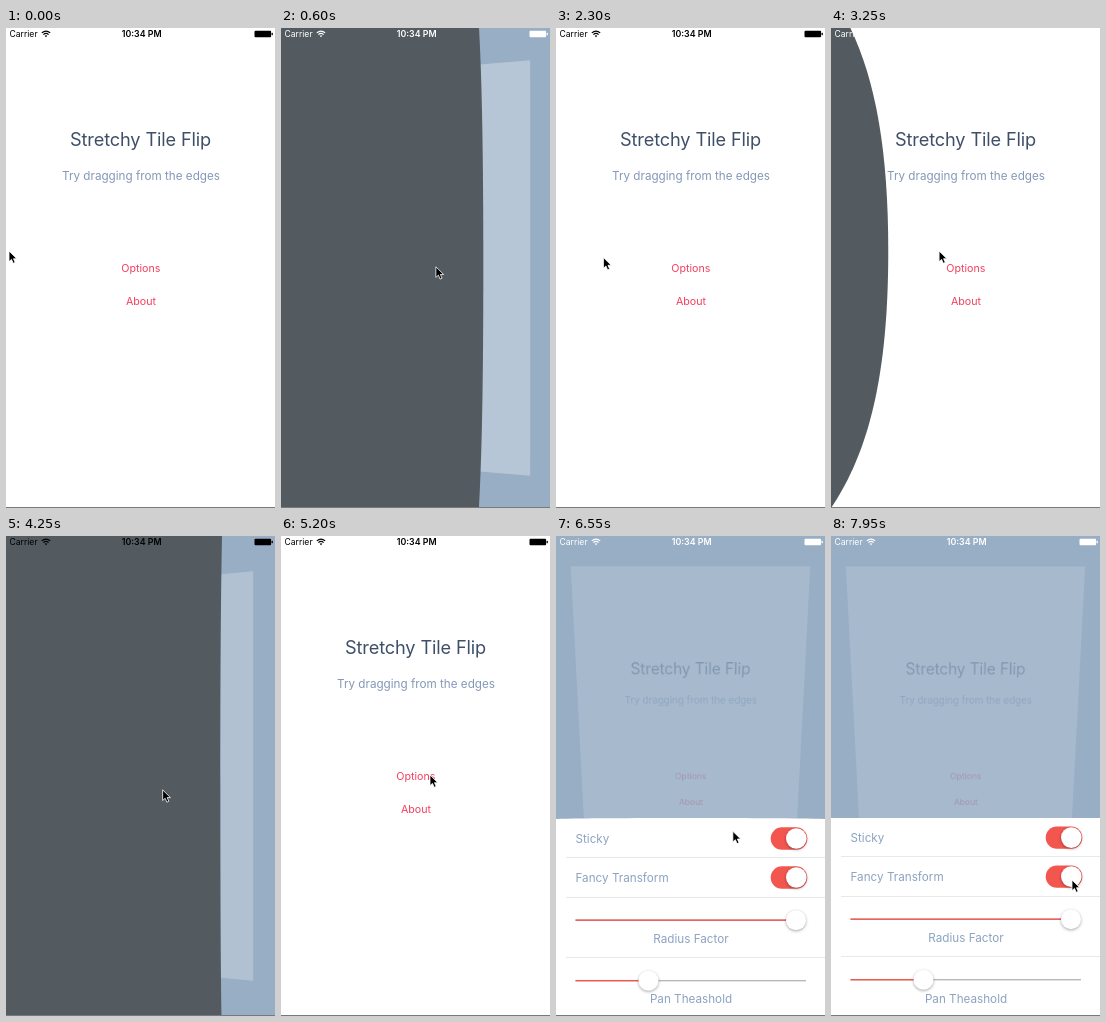
Recreate the animation shown at these times as an HTML page. Size 269 px wide and 480 px high, loop 8 s.

```html
<!DOCTYPE html>
<html lang="en">
<head>
<meta charset="utf-8">
<title>Drag menu demo</title>
<style>
  html, body { margin: 0; width: 100%; height: 100%; overflow: hidden; background: #98aec5; }
  body { position: relative; }
  #home, #top { position: absolute; left: 0; top: 0; width: 269px; height: 480px; }
  #home { background: #fff; transform-origin: 134.5px 240px; }
  svg { display: block; overflow: hidden; }
  text { font-family: Inter, Roboto, sans-serif; }
  .mid { text-anchor: middle; }
  .link { font-size: 10.7px; fill: #f2405f; }
  .label { font-size: 11.7px; fill: #8ca3c1; }
  .knob { fill: #fff; filter: drop-shadow(0 1px 1.5px rgba(0,0,0,.35)); }
</style>
</head>
<body>
<div id="home">
  <svg width="269" height="480">
    <text class="mid" x="134.5" y="118" font-size="18.2" letter-spacing="-.15" fill="#3f4f68">Stretchy Tile Flip</text>
    <text class="mid" x="135" y="151.8" font-size="11.7" fill="#8498b7">Try dragging from the edges</text>
    <text class="mid link" id="options" x="134.8" y="244">Options</text>
    <text class="mid link" x="135" y="277">About</text>
    <rect id="dim" width="269" height="480" fill="#92a9c1"/>
  </svg>
</div>
<svg id="top" width="269" height="480">
  <path id="side" fill="#535b60"/>
  <path id="sheet" fill="#fff"/>
  <g id="rows">
    <path d="M10 38.5H269M10 78.5H269M10 138.5H269" stroke="#e2e4e8" stroke-width=".8"/>
    <text class="label" x="19.5" y="23.6">Sticky</text>
    <text class="label" x="19.5" y="62.6">Fancy Transform</text>
    <text class="label mid" x="135" y="124">Radius Factor</text>
    <text class="label mid" x="135" y="184.5">Pan Theashold</text>
  </g>
  <g id="status">
    <text x="3.5" y="9.2" font-size="8.6">Carrier</text>
    <text class="mid" x="135.7" y="9.3" font-size="8.8" font-weight="600">10:34 PM</text>
    <path d="M35.8 4.9Q40 1.2 44.2 4.9M37.4 6.6Q40 4.3 42.6 6.6" fill="none" stroke="currentColor" stroke-width="1.2"/>
    <path d="M38.7 7.8Q40 6.8 41.3 7.8L40 9.2Z"/>
    <rect x="248.5" y="2.8" width="16.6" height="6.4" rx="1"/>
    <rect x="265.6" y="4.8" width="1.2" height="2.4" rx=".5"/>
  </g>
  <path d="M0 479.5H269" stroke="#77797c"/>
  <path id="cursor" d="M0 0V10.6L2.5 8.4L4.2 12.3L6.2 11.4L4.5 7.7H7.8Z" fill="#000" stroke="#fff" stroke-width=".8"/>
</svg>
<script>
const LOOP = 8000, W = 269, H = 480, OPEN = 215, SHEET = 282;
const $ = id => document.getElementById(id);
const clamp = v => Math.max(0, Math.min(1, v));

// time, x, y of the pointer
const POINTER = [
  [0, 3, 223], [350, 114, 223], [650, 158, 240], [1350, 158, 246], [1620, 58, 239],
  [2100, 57, 231], [2850, 3, 223], [2950, 3, 223], [3300, 114, 223], [3700, 158, 250],
  [4240, 158, 254], [4400, 58, 245], [4650, 62, 244], [5150, 149, 239], [5450, 149, 239],
  [5800, 148, 244], [5950, 148, 244], [6350, 165, 290], [7100, 232, 320], [7200, 232, 320],
  [7550, 238, 358], [7900, 241, 344], [8000, 241, 344]
];
// press, dragBack and release moments of each side-menu visit
const VISITS = [
  { press: 0, back: 1350, release: 1620 },
  { press: 2950, back: 4240, release: 4400 }
];
const CLICK = 5470;

function pointer(t) {
  const i = Math.max(1, POINTER.findIndex(k => k[0] > t));
  const [t0, x0, y0] = POINTER[i - 1], [t1, x1, y1] = POINTER[i];
  const u = clamp((t - t0) / (t1 - t0)), s = u * u * (3 - 2 * u);
  return { x: x0 + (x1 - x0) * s, y: y0 + (y1 - y0) * s };
}

// share of the distance left in a critically damped spring
const left = (ms, a) => {
  const q = Math.max(0, ms) / 1000 * a;
  return (1 + q) * Math.exp(-q);
};

// edge: where the corners are; mid: where the middle of the curve is
function sideMenu(t, x) {
  const v = t < 2900 ? VISITS[0] : VISITS[1];
  if (t < v.press) return { edge: 0, mid: 0 };
  const snap = v.press + 340;
  if (t < snap) return { edge: 0, mid: Math.max(0, x - 3) * .545 };
  if (t < v.back) {
    const s = (t - snap) / 1000;
    return {
      edge: OPEN * (1 - left(t - snap, 16)),
      mid: OPEN - 155 * Math.exp(-9 * s) * Math.cos(22 * s)
    };
  }
  if (t < v.release) return { edge: OPEN + 1, mid: OPEN + .47 * (x - 158) };
  const fade = 1 - clamp((t - v.release - 250) / 180);
  return {
    edge: OPEN * left(t - v.release, 16) * fade,
    mid: 168 * left(t - v.release, 18) * fade
  };
}

// bulging border from -span to +span around centre; place(along, depth) gives "x y"
function bulge(edge, mid, centre, span, place) {
  const shoulder = edge + (mid - edge) * .667;
  const at = (k, depth) => place(centre + k * span, depth);
  return `${at(-1, edge)}C${at(-.78, shoulder)} ${at(-.48, mid)} ${at(0, mid)}` +
    `C${at(.48, mid)} ${at(.78, shoulder)} ${at(1, edge)}`;
}

function add(parent, tag, attrs) {
  const el = document.createElementNS("http://www.w3.org/2000/svg", tag);
  for (const k in attrs) el.setAttribute(k, attrs[k]);
  parent.append(el);
}

function buildRows() {
  const rows = $("rows"), red = "#f3564f";
  for (const y of [19.6, 58.6]) {
    add(rows, "rect", { x: 214.7, y: y - 11.2, width: 36.6, height: 22.4, rx: 11.2, fill: red });
    add(rows, "circle", { cx: 240.3, cy: y, r: 10.3, class: "knob" });
  }
  for (const [y, x] of [[101.2, 240], [161.7, 92.5]]) {
    add(rows, "rect", { x: 19.5, y: y - .7, width: 230.5, height: 1.4, fill: "#b7b8bc" });
    add(rows, "rect", { x: 19.5, y: y - .7, width: x - 19.5, height: 1.4, fill: red });
    add(rows, "circle", { cx: x, cy: y, r: 10, class: "knob" });
  }
}

function draw(t) {
  const p = pointer(t);
  const below = t >= CLICK;
  let depth, dim, axis;

  if (below) {
    const rest = left(t - CLICK, 6.9), restMid = left(t - CLICK, 10.3);
    const edge = SHEET + (H - SHEET) * rest, mid = SHEET + (H - SHEET) * restMid;
    const border = bulge(edge, mid, W / 2, W / 2, (along, d) => `${along} ${d}`);
    $("sheet").setAttribute("d", `M${border}V${H}H0Z`);
    $("rows").setAttribute("transform", `translate(0 ${edge})`);
    depth = .96 * Math.pow(1 - rest, 1.3);
    dim = .84 * depth;
    axis = "X";
  } else {
    const { edge, mid } = sideMenu(t, p.x);
    const span = Math.max(p.y, H - p.y);
    const border = bulge(edge, mid, p.y, span, (along, d) => `${d} ${along}`);
    $("side").setAttribute("d", `M0 ${p.y - span}L${border}H0Z`);
    depth = .95 * clamp(edge / OPEN);
    dim = .75 * depth;
    axis = "Y";
  }
  $("side").style.display = below ? "none" : "";
  $("sheet").style.display = $("rows").style.display = below ? "" : "none";

  $("home").style.transform = depth < .001 ? "none" :
    `perspective(500px) scale(${1 - .2 * depth}) rotate${axis}(${-.2 * depth}rad)`;
  $("dim").setAttribute("opacity", dim);
  $("options").setAttribute("opacity", t > 5450 && t < 6200 ? .7 : 1);

  const light = t >= 30 && t < 1350 || t >= 2900 && t < 4235 || below;
  $("status").setAttribute("fill", light ? "#fff" : "#000");
  $("status").setAttribute("color", light ? "#fff" : "#000");
  $("cursor").setAttribute("transform", `translate(${p.x} ${p.y})`);
}

buildRows();
const start = performance.now();
function tick() {
  draw((performance.now() - start) % LOOP);
  requestAnimationFrame(tick);
}
tick();
</script>
</body>
</html>
```
